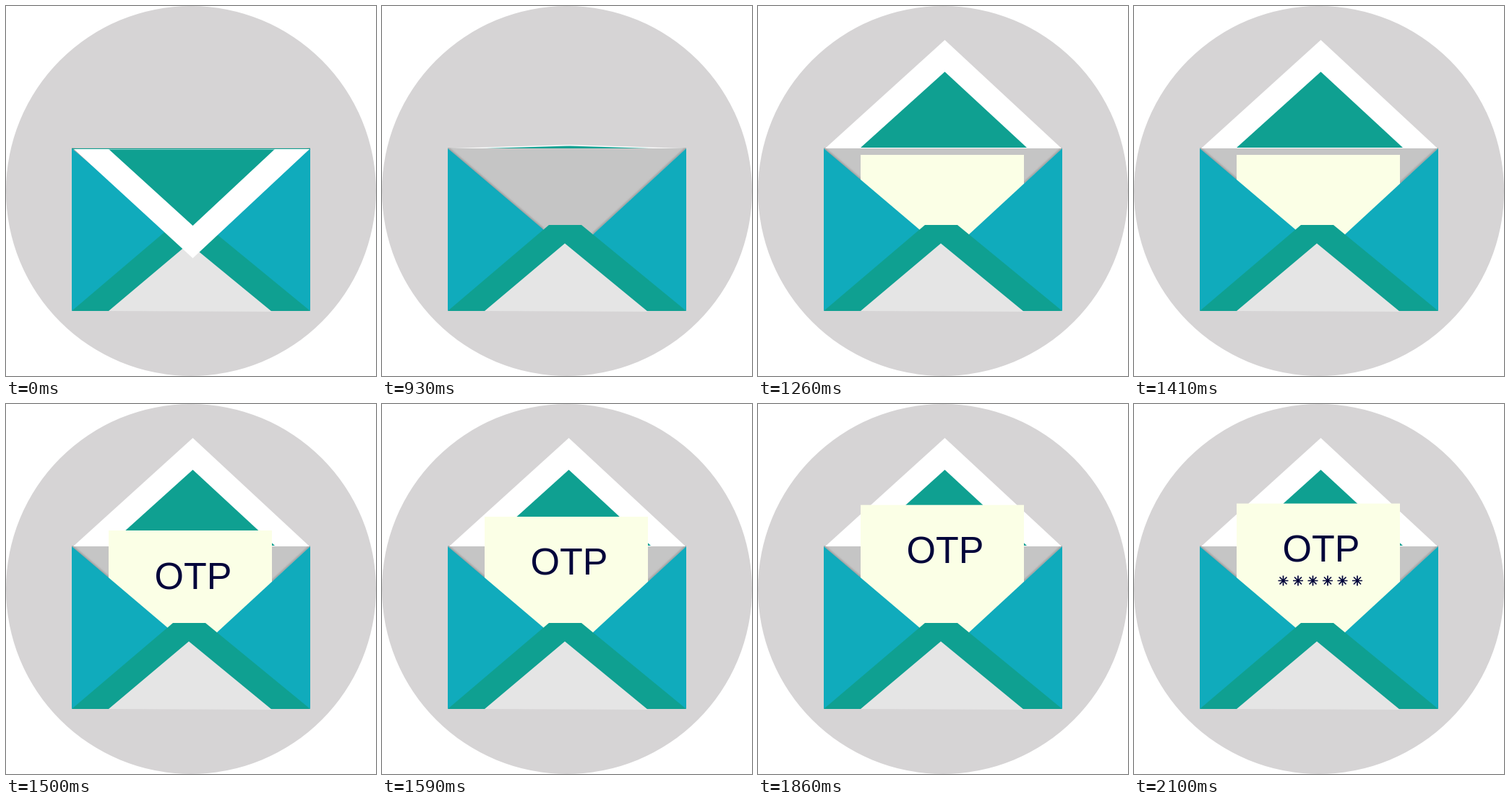
Animation, 512 px wide and 512 px high, one loop 3.6 s. Source, as an HTML page without scripts:

```html
<!DOCTYPE html>
<html lang="en">
<head>
<meta charset="utf-8">
<title>Envelope with one-time code</title>
<style>
  html, body { margin: 0; width: 100%; height: 100%; overflow: hidden; background: #fff; }
  svg { display: block; width: 100%; height: 100%; }

  .teal { fill: #0fa091; }
  .blue { fill: #10abbc; }
  .white { fill: #fff; }
  .cream { fill: #fbffe6; }
  .ink { fill: #01043a; }
  .title { font: 52px "Liberation Sans", Arial, sans-serif; text-anchor: middle; }

  /* One shared 3.6 s clock, advancing in 30 ms ticks */
  .closed, .open, .paper, .letter, .title, .stars {
    animation: 3.6s step-end infinite;
  }
  .closed { animation-name: hide; }
  .open { animation-name: unfold; transform-origin: 0 197px; }
  .paper { animation-name: fade; }
  .letter { animation-name: rise; }
  .title { animation-name: show; }
  .stars { animation-name: reveal; }

  @keyframes hide {
    0% { opacity: 1; }
    25.833%, 100% { opacity: 0; }
  }
  @keyframes unfold {
    0% { transform: scaleY(0); }
    25.833% { transform: scaleY(.033); }
    26.666% { transform: scaleY(.57); }
    27.5% { transform: scaleY(.9); }
    28.333% { transform: scaleY(1.04); }
    29.166% { transform: scaleY(1.065); }
    30% { transform: scaleY(1.053); }
    30.833% { transform: scaleY(1.033); animation-timing-function: steps(2); }
    32.5% { transform: scaleY(1.007); animation-timing-function: steps(2); }
    34.166%, 100% { transform: scaleY(1); }
  }
  @keyframes fade {
    0%, 25.833% { opacity: 0; }
    26.666% { opacity: .35; }
    27.5% { opacity: .6; }
    28.333% { opacity: .75; }
    29.166% { opacity: .85; }
    30% { opacity: .91; animation-timing-function: steps(4); }
    33.333%, 100% { opacity: 1; }
  }
  @keyframes rise {
    0%, 40% { transform: translateY(0); }
    40.833% { transform: translateY(-20.5px); }
    41.666% { transform: translateY(-31px); animation-timing-function: steps(2); }
    43.333% { transform: translateY(-45.6px); animation-timing-function: steps(2); }
    45% { transform: translateY(-54.5px); animation-timing-function: steps(2); }
    46.666% { transform: translateY(-60px); animation-timing-function: steps(2); }
    48.333% { transform: translateY(-63.3px); animation-timing-function: steps(2); }
    50% { transform: translateY(-65.3px); animation-timing-function: steps(6); }
    55%, 100% { transform: translateY(-68.3px); }
  }
  @keyframes show {
    0% { opacity: 0; }
    40.833%, 100% { opacity: 1; }
  }
  @keyframes reveal {
    0% { opacity: 0; }
    55.833% { opacity: .25; }
    56.666% { opacity: .5; }
    57.5% { opacity: .75; }
    58.333%, 100% { opacity: 1; }
  }
</style>
</head>
<body>
<svg viewBox="0 0 512 512">
  <defs>
    <clipPath id="inside"><path d="M91 196H421V197L292 316H223L91 197Z"/></clipPath>
    <filter id="soft"><feGaussianBlur stdDeviation="1.6"/></filter>
    <path id="star" d="M-7 0H7M0-7V7M-5-5L5 5M-5 5L5-5"/>
  </defs>

  <circle cx="256" cy="256" r="256" fill="#d6d4d5"/>

  <!-- Inside of the envelope -->
  <g clip-path="url(#inside)">
    <path d="M91 196H421V320H91Z" fill="#c5c5c5"/>
    <path d="M91 197L223 309M421 197L292 316" stroke="#8e8e8e" stroke-width="2.5" filter="url(#soft)"/>
  </g>

  <g class="open">
    <path class="white" d="M93 197L258.500 47L420 197Z"/>
    <path class="teal" d="M142 196L258.500 91L372 196Z"/>
  </g>

  <g class="paper">
    <g class="letter">
      <path class="cream" d="M142 206H368V400H142Z"/>
      <text class="title ink" x="259" y="286.500">OTP</text>
    </g>
  </g>

  <!-- Front pocket -->
  <path class="blue" d="M91 197L223 309L240 340L91 422Z"/>
  <path class="blue" d="M421 197L292 316L270 340L421 422Z"/>
  <path class="teal" d="M91 422L231 303H276L421 422Z"/>
  <path d="M142 422L253 328.500L368 423Z" fill="#e5e5e5"/>

  <g class="stars" fill="none" stroke="#01043a" stroke-width="1.700">
    <use href="#star" x="206.500" y="244.500"/>
    <use href="#star" x="227" y="244.500"/>
    <use href="#star" x="247.500" y="244.500"/>
    <use href="#star" x="268" y="244.500"/>
    <use href="#star" x="288.500" y="244.500"/>
    <use href="#star" x="309" y="244.500"/>
  </g>

  <g class="closed">
    <path class="white" d="M94 198L258.500 349L420 198Z"/>
    <path class="teal" d="M91 197H421V198.500H91ZM142 198L258.500 304L372 198Z"/>
    <path class="white" d="M94 198H142V199H95ZM372 198H420L419 199H372Z"/>
  </g>
</svg>
</body>
</html>
```
